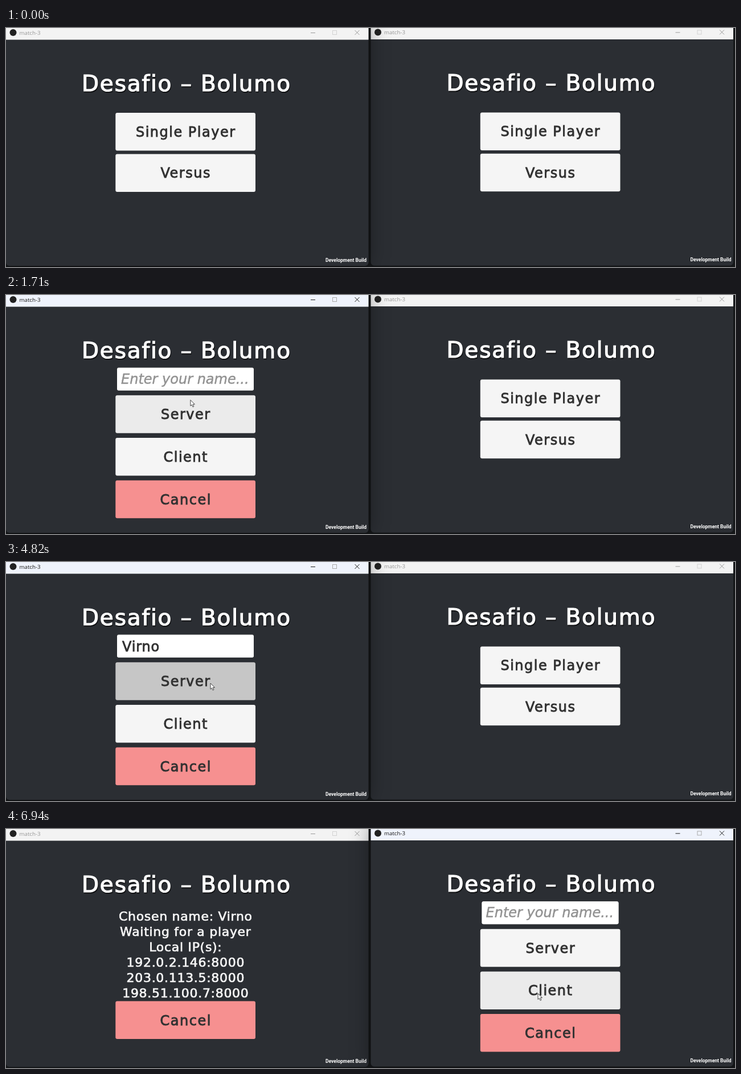
These frames come from a looping animation (1280 by 420 pixels, 8 s). An HTML page with a canvas:

```html
<!DOCTYPE html>
<html lang="pt">
<head>
<meta charset="utf-8">
<title>match-3</title>
<style>
  html, body { margin: 0; width: 100%; height: 100%; overflow: hidden; background: #141618; }
  canvas { display: block; width: 1280px; height: 420px; }
</style>
</head>
<body>
<canvas id="stage" width="1280" height="420"></canvas>
<script>
const LOOP = 8000;
const ctx = document.getElementById('stage').getContext('2d');
const UI = '"DejaVu Sans", sans-serif';
const INK = '#323232', RED = '#f69090';
const NAME = 'Virno';
const INFO = ['Chosen name: ' + NAME, 'Waiting for a player', 'Local IP(s):',
  '192.0.2.146:8000', '203.0.113.5:8000', '198.51.100.7:8000'];

// Cursor moves: start, end, destination
const MOVES = [
  [270, 540, 468, 260], [680, 1150, 351, 242], [1510, 1840, 310, 155], [4060, 4400, 366, 229],
  [4400, 4550, 359, 213], [5090, 5500, 792, 248], [5640, 5910, 922, 241], [6330, 6930, 934, 289]
];
const PRESSES = [[1305, 1500], [1980, 2130], [4720, 5150], [6165, 6250]];
const SWITCH = 6110;    // focus passes to the right window
const TYPE_START = 2860, KEY_GAP = 217;
const FADE = 100;       // button colour transition

const within = (t, a, b) => t >= a && t < b;
const clamp = v => Math.min(1, Math.max(0, v));
const ease = u => u * u * (3 - 2 * u);

function pointer(t) {
  let x = 1180, y = 425;
  for (const [a, b, toX, toY] of MOVES) {
    const u = ease(clamp((t - a) / (b - a)));
    x += (toX - x) * u;
    y += (toY - y) * u;
  }
  return [x, y];
}

// The current window: its position and the time it is drawn for.
let win, now;

// Grey of a control: its hover and press states, averaged over the fade time.
function tint(x, y, w, h, restAt) {
  const steps = 20;
  let sum = 0;
  for (let i = 0; i < steps; i++) {
    const t = now - (i + 0.5) * FADE / steps;
    const [px, py] = pointer(t);
    const over = within(px - win.x, x, x + w) && within(py - win.y, y, y + h);
    const pressed = over && PRESSES.some(([a, b]) => within(t, a, b));
    sum += pressed ? 198 : restAt(t, over);
  }
  const v = Math.round(sum / steps);
  return `rgb(${v},${v},${v})`;
}

function box(x, y, w, h, color, radius = 3) {
  ctx.fillStyle = color;
  ctx.beginPath();
  ctx.roundRect(x, y, w, h, radius);
  ctx.fill();
}

// Draws text and returns its width without the trailing gap.
function text(str, x, y, { size = 24, color = INK, gap = 0, center = false, bold = 0.9,
  style = '', family = UI } = {}) {
  ctx.font = `${style} ${size}px ${family}`;
  ctx.letterSpacing = gap + 'px';
  const width = ctx.measureText(str).width - gap;
  const left = center ? x - width / 2 : x;
  ctx.fillStyle = ctx.strokeStyle = color;
  ctx.fillText(str, left, y);
  if (bold) {
    ctx.lineWidth = bold;
    ctx.strokeText(str, left, y);
  }
  return width;
}

function button(label, y, color) {
  const area = [192.3, y, 245.7, 66.5];
  box(...area, color || tint(...area, (t, over) => over ? 235 : 245));
  text(label, 315, y + 42, { gap: 1.5, center: true });
}

function titleBar(color, active) {
  ctx.fillStyle = color;
  ctx.fillRect(0, 0, 636.5, 20.6);
  ctx.fillStyle = '#222';
  ctx.beginPath();
  ctx.arc(12.5, 8, 6, 0, 7);
  ctx.fill();
  text('match-3', 23.5, 12, { size: 9.7, color: active ? '#151515' : '#969696', bold: 0,
    family: '"Open Sans", sans-serif' });
  ctx.lineWidth = 1;
  ctx.strokeStyle = active ? '#aaa' : '#d2d2d2';
  ctx.strokeRect(573.5, 4.5, 7, 7);
  ctx.strokeStyle = active ? '#1c1c1c' : '#9a9a9a';
  ctx.beginPath();
  for (const [a, b, c, d] of [[535, 8.5, 543, 8.5], [612.5, 4, 620.5, 12], [620.5, 4, 612.5, 12]]) {
    ctx.moveTo(a, b);
    ctx.lineTo(c, d);
  }
  ctx.stroke();
}

function mainMenu() {
  button('Single Player', 149);
  button('Versus', 221.4);
}

function nameField(typed, caret) {
  const area = [195, 128.2, 240, 39.6];
  const selected = t => win.x === 0 && within(t, 2130, 4720);
  box(195, 127.5, 240, 40.3, '#c4c4c4');
  box(...area, tint(...area, (t, over) => selected(t) ? 243 : over ? 245 : 255));
  let end = 204;
  if (typed) end += text(typed, 204, 157, { gap: 0.8 }) + 1;
  else text('Enter your name...', 202, 156, { color: '#929292', style: 'italic', bold: 0.5 });
  if (caret) {
    ctx.fillStyle = INK;
    ctx.fillRect(Math.round(end) - 0.5, 133, typed ? 1.7 : 1, typed ? 31 : 34);
  }
}

function versusMenu(typed, caret) {
  nameField(typed, caret);
  ['Server', 'Client', 'Cancel'].forEach((label, i) =>
    button(label, 176.3 + 74.7 * i, i === 2 && RED));
}

function waitingScreen() {
  INFO.forEach((line, i) =>
    text(line, 315, 160.5 + 27 * i, { size: 22, gap: 0.7, color: '#f8f8f8', center: true, bold: 0.7 }));
  button('Cancel', 302.5, RED);
}

function leftScreen() {
  const typed = NAME.slice(0, Math.max(0, Math.floor((now - TYPE_START) / KEY_GAP) + 1));
  const caret = within(now, 2050, 2660) || within(now, TYPE_START, 4270);
  if (now < 1500) mainMenu();
  else if (now < 5150) versusMenu(typed, caret);
  else waitingScreen();
}

function rightScreen() {
  if (now < 6250) mainMenu();
  else versusMenu('', false);
}

const LEFT = { x: 0, y: 0, focus: [1290, SWITCH], content: leftScreen };
const RIGHT = { x: 640.5, y: -0.6, focus: [SWITCH, LOOP], content: rightScreen };

function drawWindow(target, onTop) {
  win = target;
  const active = within(now, ...win.focus);
  const settled = active && now > win.focus[0] + 140;
  ctx.save();
  ctx.translate(win.x, win.y);
  if (onTop) {
    ctx.shadowColor = 'rgba(0,0,0,.4)';
    ctx.shadowBlur = 36;
  }
  box(0, -10, 636.5, 428, '#2b2e33', 6);
  ctx.shadowColor = 'transparent';
  titleBar(settled ? '#eff3fc' : active ? '#f0f2f5' : '#f3f3f3', active);
  const title = { size: 39, gap: 1.8, center: true, bold: 1.2 };
  text('Desafio – Bolumo', 317, 113, { ...title, color: '#121315' });
  text('Desafio – Bolumo', 316, 111, { ...title, color: '#fff' });
  win.content();
  text('Development Build', 597, 411, { size: 8.5, color: '#fff', center: true, bold: 0,
    style: 'bold', family: 'Roboto, sans-serif' });
  ctx.restore();
}

function drawCursor() {
  if (now < 330) return;
  ctx.save();
  ctx.translate(...pointer(now));
  if (within(now, 1290, 1430)) {
    ctx.fillStyle = 'rgba(232,228,70,.85)';
    ctx.beginPath();
    ctx.arc(0, 0, 9.7, 0, 7);
    ctx.fill();
  }
  ctx.fillStyle = '#fff';
  ctx.strokeStyle = '#333';
  ctx.lineWidth = 0.9;
  const arrow = new Path2D('M0 0V10.5L2.4 8.3 4.1 12.3 5.9 11.5 4.3 7.6H7.5Z');
  ctx.fill(arrow);
  ctx.stroke(arrow);
  ctx.restore();
}

function draw(t) {
  now = t;
  ctx.fillStyle = '#141618';
  ctx.fillRect(0, 0, 1280, 420);
  const [back, front] = now < SWITCH ? [RIGHT, LEFT] : [LEFT, RIGHT];
  drawWindow(back, false);
  drawWindow(front, true);
  drawCursor();
}

const start = performance.now();
function tick() {
  draw((performance.now() - start) % LOOP);
  requestAnimationFrame(tick);
}
tick();
</script>
</body>
</html>
```
